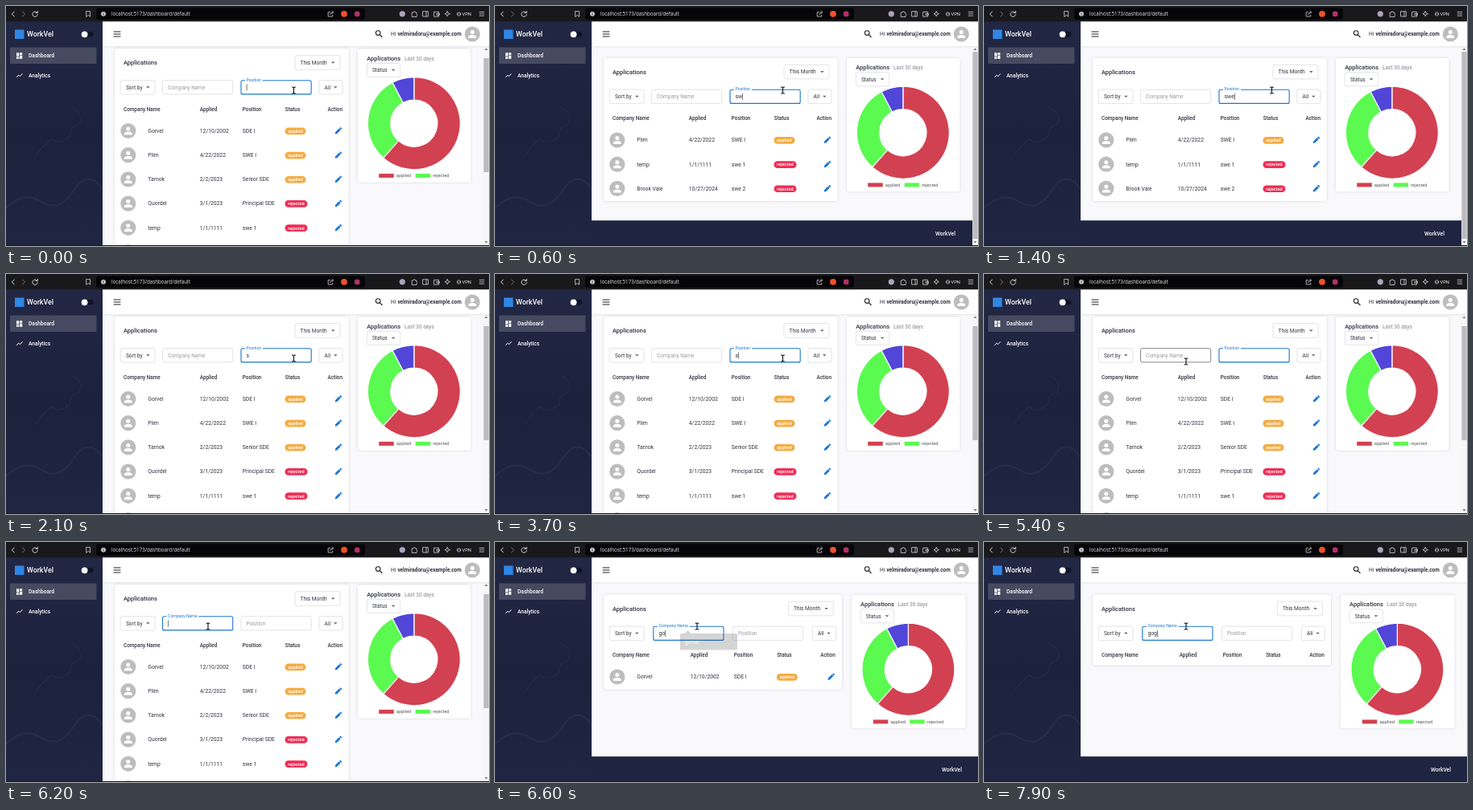
An HTML page for the animation above (8000 ms loop, 600 by 299 pixels).

```html
<!DOCTYPE html>
<html lang="en">
<head>
<meta charset="utf-8">
<title>Dashboard</title>
<style>
  html, body { margin: 0; width: 100%; height: 100%; overflow: hidden; background: #f9f9fb; }
  svg { display: block; width: 600px; height: 299px; }
  text { font-family: Roboto, Arial, sans-serif; white-space: pre; }
  .card { fill: #fff; filter: drop-shadow(0 .6px 1.8px rgba(40, 45, 70, .18)); }
  .line { fill: none; stroke-linecap: round; stroke-linejoin: round; }
</style>
</head>
<body>
<svg viewBox="0 0 600 299" xmlns="http://www.w3.org/2000/svg">
  <defs>
    <linearGradient id="side" x1="0" y1="0" x2="0" y2="1">
      <stop offset="0" stop-color="#222744"/>
      <stop offset=".5" stop-color="#1c213c"/>
      <stop offset="1" stop-color="#202541"/>
    </linearGradient>
  </defs>
  <g id="page"></g>
  <g id="frame"></g>
  <g id="popup">
    <path d="M235.5 114l4-4 4 4z" fill="#3c3c40"/>
    <rect x="230" y="114" width="71" height="20.5" rx="1.5" fill="#3c3c40"/>
    <text x="236" y="127" font-size="6.4" fill="#fff">gorvel</text>
  </g>
  <path id="mouse" class="line" stroke="#111" stroke-width="1.1"
    d="M-2 -4Q-.3 -4 0 -3.2Q.3 -4 2 -4M0 -3.2V3.2M-2 4Q-.3 4 0 3.2Q.3 4 2 4"/>
</svg>
<script>
const LOOP = 8000;
const BRAND = 'WorkVel';
const INK = '#30323f', NAVY = '#1f2440', BLUE = '#1976d2';
const $ = id => document.getElementById(id);

const jobs = [
  ['Gorvel', '12/10/2002', 'SDE I', 1],
  ['Plim', '4/22/2022', 'SWE I', 1],
  ['Tarnok', '2/2/2023', 'Senior SDE', 1],
  ['Quordel', '3/1/2023', 'Principal SDE', 0],
  ['temp', '1/1/1111', 'swe 1', 0],
  ['Brook Vale', '10/27/2024', 'swe 2', 0]
];

// time, focused field, its text
const keys = [
  [-200, 'position', ''], [300, 'position', 's'], [500, 'position', 'sw'], [900, 'position', 'swe'],
  [2100, 'position', 's'], [2500, 'position', 'sd'], [2800, 'position', 'sde'],
  [3600, 'position', 's'], [4000, 'position', 'se'], [4200, 'position', 'sen'],
  [5400, 'position', ''], [5800, 'company', ''], [6400, 'company', 'g'],
  [6500, 'company', 'go'], [7400, 'company', 'gog']
];

const pen = document.createElement('canvas').getContext('2d');
const widthOf = (s, size) => {
  pen.font = `${size * 10}px Roboto, Arial, sans-serif`;
  return pen.measureText(s).width / 10;
};

// y is the middle of the line
const text = (x, y, s, size = 6.6, fill = INK, weight = 400, more = '') =>
  `<text x="${x}" y="${y + size * .355}" font-size="${size}" fill="${fill}" font-weight="${weight}" ${more}>${s}</text>`;
const rect = (x, y, w, h, fill, rx = 0, more = '') =>
  `<rect x="${x}" y="${y}" width="${w}" height="${h}" rx="${rx}" fill="${fill}" ${more}/>`;
const circle = (x, y, r, fill, more = '') => `<circle cx="${x}" cy="${y}" r="${r}" fill="${fill}" ${more}/>`;
const line = (d, color, w = 1) => `<path class="line" d="${d}" stroke="${color}" stroke-width="${w}"/>`;
const shape = (d, fill) => `<path d="${d}" fill="${fill}"/>`;
const box = (x, y, w, h, color, stroke = .6) =>
  rect(x, y, w, h, '#fff', 2, `stroke="${color}" stroke-width="${stroke}"`);

const avatar = (x, y) => circle(x, y, 9.6, '#bdbdbd') + circle(x, y - 2.5, 2.5, '#fff') +
  shape(`M${x - 5} ${y + 5}v-1.3q.6-2.7 5-2.7t5 2.7v1.3z`, '#fff');

const select = (x, y, w, h, label) => box(x, y, w, h, '#cfd0d6') +
  text(x + 6.6, y + h / 2, label, 6.6) +
  shape(`M${x + w - 11} ${y + h / 2 - 1}h4.6l-2.3 2.3z`, '#666');

const pencil = (x, y) => `<g transform="translate(${x} ${y}) rotate(45)">` +
  rect(-1.4, -5.6, 2.8, 1.8, BLUE, .5) + shape('M-1.4 -3.2h2.8v6.4l-1.4 2.2l-1.4-2.2z', BLUE) + '</g>';

const badge = (x, y, applied) => rect(x, y - 4.3, applied ? 26 : 28, 8.7, applied ? '#f5ab40' : '#ee2d56', 4.3) +
  text(x + (applied ? 13 : 14), y, applied ? 'applied' : 'rejected', 5.6, '#fff', 500, 'text-anchor="middle"');

function field(x, name, label, state) {
  const y = 104.2, w = 87.2, h = 17.2, focused = state.focus === name;
  if (!focused) {
    const hover = name === 'company' && state.hover;
    return box(x, y, w, h, hover ? '#33343c' : '#cfd0d6') + text(x + 6.6, y + 8.8, label, 6.5, '#9a9ca5');
  }
  const tag = widthOf(label, 5.1);
  let out = box(x, y, w, h, BLUE, 1.1) + rect(x + 5, y - 2, tag + 3.4, 4, '#fff') +
    text(x + 6.6, y - .6, label, 5.1, BLUE) + text(x + 6.6, y + 8.8, state.typed, 6.8);
  if (state.caret) out += rect(x + 6.8 + widthOf(state.typed, 6.8), y + 4.6, .6, 8.2, '#222');
  return out;
}

function donut(cx, cy) {
  const R = 57.5, r = 29, at = (n, rad) => {
    const a = n / 13 * 2 * Math.PI;
    return `${cx + rad * Math.sin(a)} ${cy - rad * Math.cos(a)}`;
  };
  return [[0, 8, '#d24151'], [8, 12, '#5bfa50'], [12, 13, '#5146d8']].map(([a, b, c]) => {
    const big = b - a > 6.5 ? 1 : 0;
    return `<path d="M${at(a, R)}A${R} ${R} 0 ${big} 1 ${at(b, R)}L${at(b, r)}A${r} ${r} 0 ${big} 0 ${at(a, r)}Z"
      fill="${c}" stroke="#fff" stroke-width="1.2"/>`;
  }).join('');
}

function chart(x, w) {
  const mid = x + w / 2 - .4;
  const legend = (lx, color, label) => rect(lx, 220.4, 18.5, 5, color) + text(lx + 21.6, 222.9, label, 5.7, '#555');
  return rect(x, 65, w, 166.2, '#fff', 3, 'class="card"') +
    text(x + 11.3, 76.8, 'Applications', 7.5, INK, 500) +
    text(x + 58, 77, 'Last 30 days', 6.5, '#9a9ca5', 500) +
    select(x + 11.3, 82.8, 41.5, 17, 'Status') + donut(mid, 157.7) +
    legend(mid - 43.6, '#d24151', 'applied') + legend(mid + 1.8, '#5bfa50', 'rejected');
}

function scrollbar(top, end) {
  return rect(593, 50, 7, 249, '#f6f6f7') + rect(593.4, top, 6.2, end - top, '#bcbcc0') +
    shape('M594.5 55l2-2.4l2 2.4z', '#777') + shape('M594.5 293l2 2.4l2-2.4z', '#777');
}

function page(state) {
  const rows = jobs.filter(j =>
    j[state.focus === 'company' ? 0 : 2].toLowerCase().includes(state.typed));
  const n = rows.length, wide = n < 3, tall = n > 3;
  const shift = wide ? 1 : tall ? -11.5 : 0;
  // columns spread when the scrollbar is gone
  const X = wide ? [146, 242.7, 296.7, 350.2, 404.2] : [146, 240.8, 293.8, 346.8, 399.5];
  const right = wide ? 431 : 425.7;
  let out = rect(120, 50, 480, 249, '#f9f9fb') + `<g transform="translate(0 ${shift})">`;
  out += rect(135, 64.5, right - 135, 88 + n * 30.2, '#fff', 3, 'class="card"') +
    text(146, 82, 'Applications', 7.5, INK, 500) +
    select(right - 66.7, 73.2, 56, 17.6, 'This Month') +
    select(142.3, 104, 42.7, 17.6, 'Sort by') +
    field(wide ? 196.8 : 194.5, 'company', 'Company Name', state) +
    field(wide ? 295.4 : 292, 'position', 'Position', state) +
    select(right - 36.7, 104, 29, 17.6, 'All');
  ['Company Name', 'Applied', 'Position', 'Status', 'Action'].forEach((s, i) => {
    out += text(X[i], 140.2, s, 6.4, INK, 500);
  });
  rows.forEach(([company, date, position, applied], i) => {
    const y = 167 + i * 30.2;
    out += avatar(151.8, y) + text(176.3, y, company, 6.75) + text(X[1], y, date, 6.75) +
      text(X[2], y, position, 6.75) + badge(X[3] - .3, y + .3, applied) + pencil(X[4] + 13, y + .3);
  });
  out += wide ? chart(442.8, 142) : chart(437, 140.5);
  out += '</g>';
  if (!tall) out += rect(120, 267.2, 480, 32, NAVY) + text(wide ? 555 : 547, 283.6, BRAND, 6.7, '#fff', 500);
  if (!wide) out += tall ? scrollbar(65, 207) : scrollbar(57, 290);
  return out;
}

function frame() {
  const pale = '#d4d4d8', faint = 'rgba(120,130,170,.1)';
  let out = rect(120, 19, 480, 31, '#fff', 0, 'class="card"') + rect(0, 19, 120, 280, 'url(#side)');
  // sidebar
  out += line('M84 128q14 8 6 20q-12 4-10 14q-14 12-24 4q-10 8-20 22', faint, 1.2) +
    line('M0 252q22-22 44-8t40-14t36-2', faint, 2) +
    rect(11, 29.5, 11.5, 11.5, '#2f86e4') + text(26, 35.3, BRAND, 8.9, '#fff', 500) +
    rect(94.5, 32, 14, 6.6, '#10142a', 3.3) + circle(97.6, 35.3, 3.9, '#fff') +
    rect(5, 51.5, 107.5, 20.5, '#454a60', 1) +
    rect(13, 58.3, 3.2, 4.2, '#fff') + rect(13, 63.3, 3.2, 2.5, '#fff') +
    rect(17, 58.3, 3.2, 2.5, '#fff') + rect(17, 61.6, 3.2, 4.2, '#fff') +
    text(28, 62, 'Dashboard', 6.6, '#fff', 500) +
    line('M13.4 88.5l2.3-2.4l1.7 1.5l2.8-3', '#fff', 1) + text(28, 86.2, 'Analytics', 6.6, '#fff', 500);
  // header
  out += line('M134 32h8M134 35h8M134 38h8', '#222', 1) +
    circle(462.2, 33.6, 2.8, 'none', 'stroke="#222" stroke-width="1.1"') + line('M464.4 35.8l2.7 2.7', '#222', 1.2) +
    text(478, 34.6, 'Hi', 6.6) + text(486.4, 34.6, 'velmiradoru@example.com', 6.45, INK, 700) + avatar(579.3, 35);
  // browser bar
  out += rect(0, 0, 600, 19.3, '#19191c') + rect(112, 2.5, 334, 14.5, '#060608', 3) +
    line('M10.3 7l-3 3l3 3', pale) + line('M20.5 7l3 3l-3 3', '#77777c') +
    line('M38.6 8.2a3.2 3.2 0 1 0 .7 2.4M39.3 6.4v2.2h-2.2', pale) +
    line('M100 6.6h4.6v6.6l-2.3-1.8l-2.3 1.8z', pale, .8) +
    circle(121, 9.8, 2.9, pale) + line('M121 9.6v1.6M121 8.2v.1', '#060608', .8) +
    text(131, 9.7, 'localhost:5173/dashboard/default', 6.2, '#e8e8ea', 400,
      'style="font-family:\'Open Sans\',sans-serif"') +
    line('M402.5 7.6h-2.3v5.4h5.6v-1.8M402.6 10.6q.4-2.8 3.8-2.8M404.8 6.2l1.8 1.6l-1.8 1.6', pale, .8) +
    circle(420, 9.8, 3.9, '#f1502b') + circle(436.2, 9.9, 3.4, '#b3306a') +
    circle(492.3, 9.8, 3.6, '#a9a3bd') +
    line('M504.6 8h1.4a1.2 1.2 0 0 1 2.4 0h1.6v1.8a1.2 1.2 0 0 1 0 2.2v1.5h-5.4z', pale, .8) +
    line('M518 6.8h6.4v6.2h-6.4zM522 6.8v6.2', pale, .8) +
    line('M532 7.4h5.6v5.8h-5.6zM535.4 9.4h3v1.9h-3z', pale, .8) +
    line('M548.3 6.6l.9 2.2l2.4.9l-2.4.9l-.9 2.4l-.9-2.4l-2.4-.9l2.4-.9z', pale, .8) +
    circle(562.6, 10, 2.2, 'none', `stroke="${pale}" stroke-width=".7"`) + line('M560.4 10h4.4', pale, .6) +
    text(566.5, 10, 'VPN', 5.8, '#e8e8ea') +
    line('M588.2 7.4h5.6M588.2 9.8h5.6M588.2 12.2h5.6', pale, .8);
  return out + rect(0, 298, 600, 1, '#1b1719');
}

const ease = (t, a, b) => {
  const p = Math.min(1, Math.max(0, (t - a) / (b - a)));
  return p * p * (3 - 2 * p);
};

let shown = '';
function draw(t) {
  const [last, before = last] = keys.filter(k => k[0] <= t).reverse();
  const [since, focus, typed] = last;
  // the caret comes back a moment after a deletion
  const lag = typed.length < before[2].length ? 100 : 0;
  const beat = (t - since - lag + 1000) % 1000;
  const state = { focus, typed, caret: beat < 600, hover: t >= 5150 };
  const id = JSON.stringify(state);
  if (id !== shown) {
    $('page').innerHTML = page(state);
    shown = id;
  }
  const go = ease(t, 4900, 5250);
  const x = 357.5 - 106.5 * go, y = 105 + 4 * go - 4 * ease(t, 5500, 5700);
  $('mouse').setAttribute('transform', `translate(${x} ${y})`);
  $('popup').setAttribute('opacity', t < 6400 ? 0 : 1 - ease(t, 6460, 6660));
}

$('frame').innerHTML = frame();
const start = performance.now();
function tick(now) {
  draw(Math.max(0, now - start) % LOOP);
  requestAnimationFrame(tick);
}
tick(start);
</script>
</body>
</html>
```
